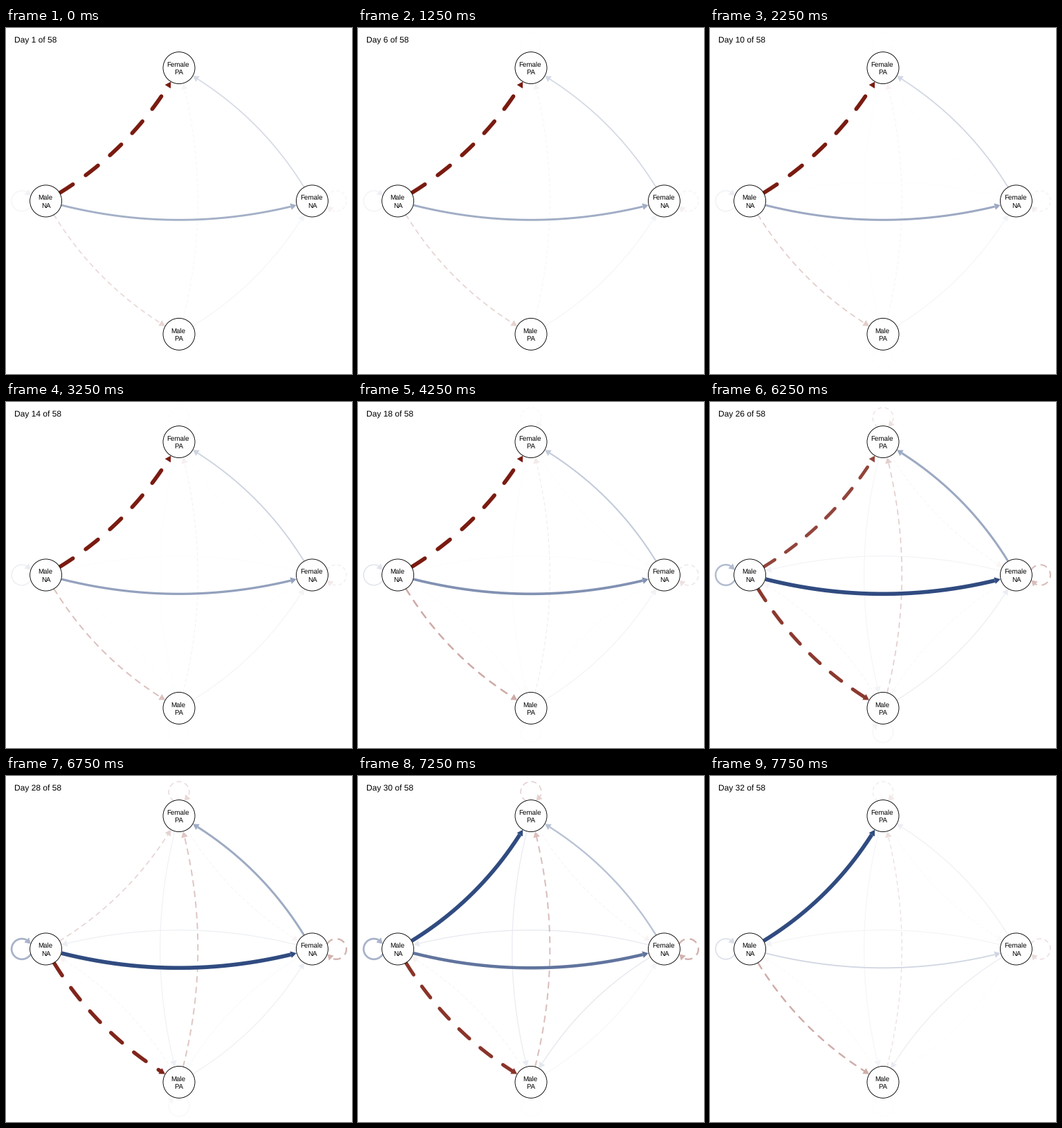
Animation, 500 px wide and 500 px high, one loop 8 s. Source, as a matplotlib script:

```python
import matplotlib.pyplot as plt
import numpy as np
from matplotlib.animation import FuncAnimation

SIZE, DPI = 500, 100
PX = 72 / DPI                # points per pixel
FRAMES, STEP = 32, 250
CENTRE, SPREAD, NODE_R = 250 + 250j, 192.4, 23
LOOP_R, LOOP_OUT = 14.8, 34.7
HEAD_LEN, HEAD_HALF = 8.2, 4.9
BEND = .142
TURN, SPAN = 25, 4           # step where growth turns, steps to the late state
POS = np.array([48, 75, 128]) / 255
NEG = np.array([122, 27, 16]) / 255

plt.rcParams.update({"font.family": "Liberation Sans",
                     "text.hinting": "none",
                     "text.kerning_factor": 6})

# Positions as complex numbers, y pointing down, clockwise from the top
NODES = {name: CENTRE - 1j * SPREAD * 1j ** k
         for k, name in enumerate(["FP", "FN", "MP", "MN"])}

# Signed strength at the start, at the turn and late; negative is dashed
EDGES = {
    "MN FP": (-1, -.82, 1),
    "MN FN": (.43, 1, .77),
    "MN MP": (-.17, -.87, -.89),
    "FN FP": (.2, .48, .34),
    "MP FN": (.06, .1, .05),
    "MP FP": (-.04, -.21, -.28),
    "FN MN": (0, .07, .12),
    "FP MP": (0, .06, .11),
    "FN MP": (0, -.03, .13),
    "FP FN": (0, -.04, -.05),
    "MP MN": (0, -.04, -.05),
    "MN MN": (.07, .37, .42),
    "FN FN": (-.06, -.29, -.34),
    "FP FP": (0, -.13, -.2),
    "MP MP": (0, .06, .01),
}


def strength(i, start, turn, late):
    """Exponential growth up to the turn, then accelerating drift."""
    if i <= TURN:
        return start + (turn - start) * np.exp((i - TURN) / 6)
    return turn + (late - turn) * ((i - TURN) / SPAN) ** 1.5


def edge_path(p, q):
    """Curve bending to the right of travel, or a clockwise self loop."""
    t = np.linspace(0, 1, 800)
    if p == q:
        out = (p - CENTRE) / SPREAD
        z = p + LOOP_OUT * out - LOOP_R * out * np.exp(2j * np.pi * t)
    else:
        ctrl = (p + q) / 2 + BEND * 1j * (q - p)
        z = (1 - t) ** 2 * p + 2 * t * (1 - t) * ctrl + t ** 2 * q
    return z[(abs(z - p) >= NODE_R) & (abs(z - q) >= NODE_R)]


def split_head(z):
    """Return the line up to the arrow head, and the head's corners."""
    tip = z[-1]
    line = z[:np.nonzero(abs(z - tip) >= HEAD_LEN)[0][-1] + 1]
    base = line[-1]
    side = 1j * HEAD_HALF * (tip - base) / abs(tip - base)
    head = np.array([tip, base + side, base - side])
    return line, np.column_stack([head.real, head.imag])


fig = plt.figure(figsize=(SIZE / DPI, SIZE / DPI), dpi=DPI, facecolor="white")
ax = fig.add_axes([0, 0, 1, 1])
ax.set(xlim=(0, SIZE), ylim=(SIZE, 0))
ax.axis("off")

edges = []
for name, states in EDGES.items():
    path, corners = split_head(edge_path(*(NODES[n] for n in name.split())))
    line, = ax.plot(path.real, path.imag, solid_capstyle="butt",
                    dash_capstyle="round")
    head = plt.Polygon(corners, closed=True, lw=0)
    ax.add_patch(head)
    edges.append((line, head, states))

for name, z in NODES.items():
    ax.add_patch(plt.Circle((z.real, z.imag), NODE_R, fc="white", ec="black",
                            lw=.9 * PX, zorder=5))
    who = "Female" if name[0] == "F" else "Male"
    for text, dx, dy in ((who, -1.3, -1.7), (name[1] + "A", .2, 9.6)):
        ax.text(z.real + dx, z.imag + dy, text, size=9.8 * PX, ha="center",
                va="baseline", zorder=6)

title = ax.text(12, 22, "", size=12 * PX, va="baseline", zorder=6)


def update(i):
    title.set_text(f"Day {i + 1} of 58")
    values = [strength(i, *states) for _, _, states in edges]
    top = max(map(abs, values))
    for (line, head, _), value in zip(edges, values):
        k = abs(value) / top
        color = 1 - (1 - (POS if value >= 0 else NEG)) * k
        line.set_linestyle((0, (4, 4)) if value < 0 else "-")
        line.set_linewidth(max(1, .65 + 5.02 * k) * PX)
        line.set_color(color)
        head.set_facecolor(color)
        line.set_zorder(1 + k)
        head.set_zorder(1 + k)
    return []


anim = FuncAnimation(fig, update, frames=FRAMES, interval=STEP,
                     repeat=True, repeat_delay=0)
plt.show()
```
